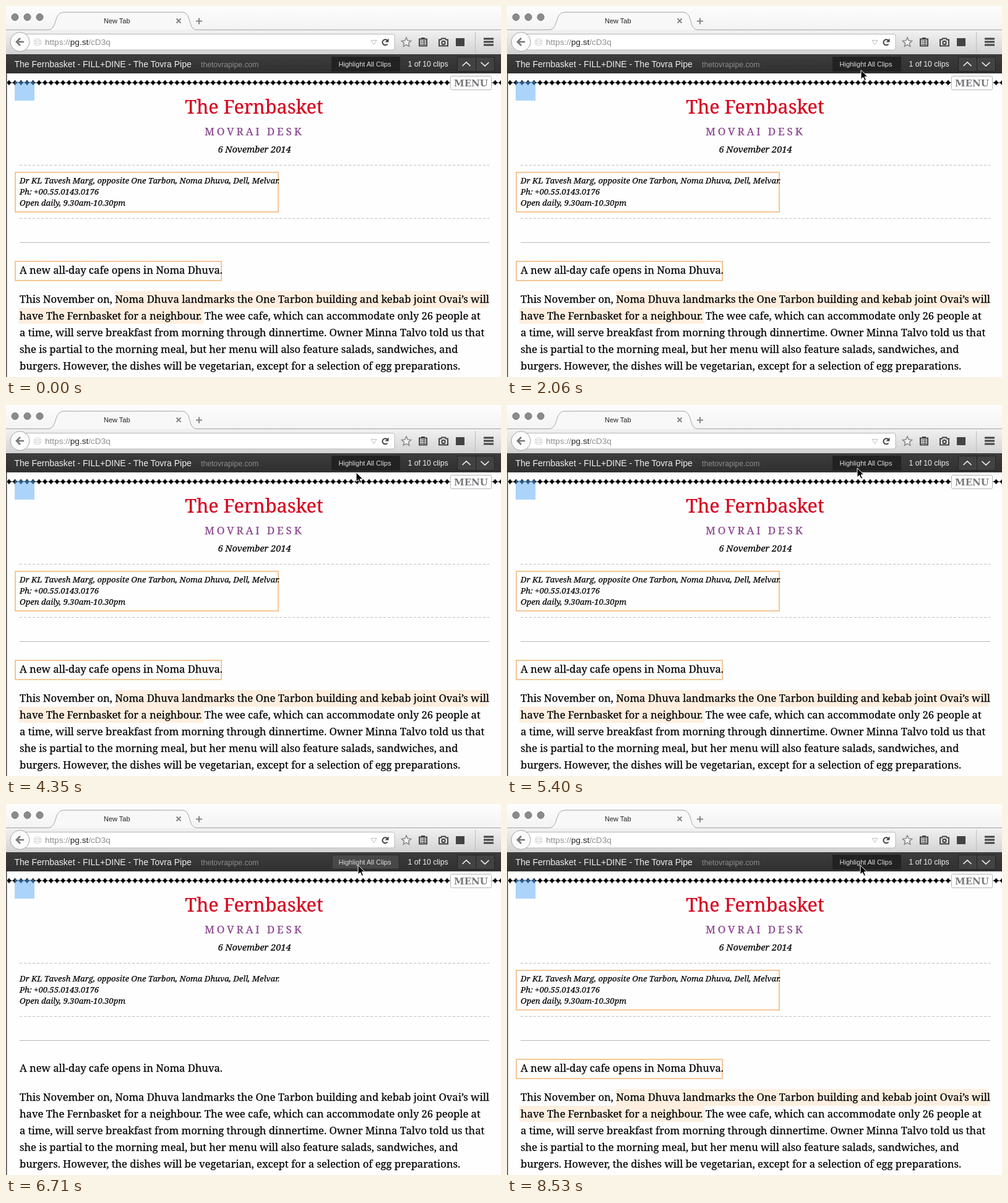
An HTML page that plays this animation: 800x600 px, repeating every 8.61 s.

```html
<!DOCTYPE html>
<html lang="en">
<head>
<meta charset="utf-8">
<title>Highlight All Clips</title>
<style>
  html, body { margin: 0; width: 100%; height: 100%; overflow: hidden; background: #fff; }
  svg { display: block; width: 100vw; height: 100vh; }
  text { white-space: pre; }
  .ui { font-family: "Liberation Sans", Arial, sans-serif; }
  .page { font-family: "Noto Serif", Georgia, serif; fill: #000; stroke: #000; stroke-width: .25; }
  .body { font-size: 16.6px; }
  .address { font-size: 13.1px; font-style: italic; }
  .title { fill: #d6001c; stroke: #d6001c; }
  .byline { fill: #86418c; stroke: #86418c; }
  .line { fill: none; stroke: #444; stroke-width: 2; }

  .clips, .button-on { animation: toggle 8.61s step-end infinite; }
  @keyframes toggle {
    0%, 89.08% { visibility: visible; }
    69.8% { visibility: hidden; }
  }

  .cursor { animation: move 8.61s linear infinite, show 8.61s step-end infinite; }
  @keyframes show {
    0% { visibility: hidden; }
    5.8% { visibility: visible; }
  }
  @keyframes move {
    0%, 5.8% { transform: translate(720px, 168px); animation-timing-function: ease-out; }
    11.73%, 13% { transform: translate(638px, 101px); animation-timing-function: ease-in-out; }
    32%, 36% { transform: translate(533px, 105px); animation-timing-function: ease-in-out; }
    49%, 52% { transform: translate(566px, 109px); animation-timing-function: ease-in-out; }
    60%, 66% { transform: translate(566px, 102px); }
    71%, 80% { transform: translate(569px, 99px); }
    88%, 100% { transform: translate(571px, 99px); }
  }
</style>
</head>
<body>
<svg viewBox="0 0 800 600">
  <defs>
    <linearGradient id="tabbar" x2="0" y2="1">
      <stop stop-color="#fdfdfd"/><stop offset="1" stop-color="#f3f3f3"/>
    </linearGradient>
    <linearGradient id="toolbar" x2="0" y2="1">
      <stop stop-color="#f2f2f2"/><stop offset="1" stop-color="#d3d3d3"/>
    </linearGradient>
    <linearGradient id="clipbar" x2="0" y2="1">
      <stop stop-color="#3c3c3c"/><stop offset="1" stop-color="#303030"/>
    </linearGradient>
    <pattern id="stars" y="119" width="9.7" height="10" patternUnits="userSpaceOnUse">
      <path d="M0 5Q3.5 3.6 4.85 .4Q6.2 3.6 9.7 5Q6.2 6.4 4.85 9.6Q3.5 6.4 0 5" fill="#000"/>
    </pattern>
  </defs>
  <rect width="800" height="600" fill="#fefefe"/>

  <!-- Tab bar -->
  <rect width="800" height="39" fill="url(#tabbar)"/>
  <g fill="#8b8b8b" stroke="#747474">
    <circle cx="14.5" cy="18" r="5.5"/>
    <circle cx="34.5" cy="18" r="5.5"/>
    <circle cx="54.5" cy="18" r="5.5"/>
  </g>
  <rect y="38" width="800" height="40" fill="url(#toolbar)"/>
  <path d="M0 38.5H68C84 38 76 10 94 10H284C301 10 293 38 308 38.5H800" fill="#f8f8f8" stroke="#a2a2a2"/>
  <text class="ui" x="158" y="28" font-size="11" fill="#222">New Tab</text>
  <path d="M275.5 20.5l7 7m0-7l-7 7M307 24.5h10m-5-5v10" class="line" style="stroke:#858585"/>

  <!-- Toolbar -->
  <path d="M30 45.5H625a3 3 0 0 1 3 3V68a3 3 0 0 1-3 3H30z" fill="#fff" stroke="#b9b9b9"/>
  <circle cx="22.5" cy="58" r="15.5" fill="#fbfbfb" stroke="#a6a6a6"/>
  <path d="M29 58H17m6-6l-6 6 6 6" class="line" style="stroke:#777;stroke-width:2.6"/>
  <circle cx="51" cy="58.5" r="6.5" fill="#e0e0e0"/>
  <path d="M45 58.5h12M51 52v13M47 54q4 3 8 0M47 63q4-3 8 0" fill="none" stroke="#fff"/>
  <text class="ui" x="63" y="63" font-size="13.6" fill="#8e8e8e">https://<tspan fill="#222">pg.st</tspan>/cD3q</text>
  <path d="M590 55.5h9l-4.5 7z" fill="#fff" stroke="#bbb"/>
  <path d="M616.5 61.5a4.5 4.5 0 1 1-.5-6" class="line"/>
  <path d="M618.5 52.5v6h-6z" fill="#444"/>
  <path d="M647 51l2.200 4.900 5.300.6-4 3.600 1.100 5.200-4.600-2.600-4.600 2.600 1.100-5.200-4-3.600 5.300-.6z" fill="#f3f3f3" stroke="#858585" stroke-width="1.500"/>
  <path d="M668 53.500h12v11h-12zM671 52h6" class="line"/>
  <path d="M670 56.500h2m1 0h5m-8 2.700h2m1 0h5m-8 2.700h2m1 0h5" class="line" style="stroke-width:1.500"/>
  <path d="M700 54.500h3l1-2h6l1 2h3v10h-14z" class="line"/>
  <circle cx="707" cy="59.500" r="2.700" class="line"/>
  <rect x="727" y="52" width="14" height="13" fill="#444"/>
  <path d="M758.500 42v34" stroke="#bcbcbc"/>
  <path d="M772 53h16m-16 5h16m-16 5h16" class="line" style="stroke-width:3"/>

  <!-- Clip bar -->
  <rect y="78" width="800" height="31" fill="url(#clipbar)"/>
  <g class="ui" fill="#f0f0f0">
    <text x="13.500" y="99" font-size="14">The Fernbasket - FILL+DINE - The Tovra Pipe</text>
    <text x="315" y="99" font-size="12.200" fill="#8c8c8c">thetovrapipe.com</text>
    <rect x="527" y="82.500" width="108" height="22.500" fill="#484848" stroke="#2b2b2b"/>
    <rect class="button-on" x="526" y="82" width="111" height="24" fill="#222"/>
    <text x="537.500" y="98" font-size="11" fill="#ddd">Highlight All Clips</text>
    <text x="649.500" y="98" font-size="12.200">1 of 10 clips</text>
  </g>
  <path d="M729.500 82.500h30v23h-30zM759.500 82.500h30v23h-30z" fill="#424242" stroke="#242424"/>
  <path d="M737.500 97l6.500-6 6.500 6M767.500 91l6.500 6 6.500-6" class="line" style="stroke:#eee;stroke-width:1.700"/>

  <!-- Page -->
  <rect y="109" width="1.500" height="491" fill="#484848"/>
  <rect x="2" y="119" width="798" height="10" fill="url(#stars)"/>
  <rect x="14" y="122" width="32" height="31" fill="#5dabf7" opacity=".5"/>
  <rect x="718.500" y="113.500" width="66" height="22" rx="2" fill="#fff" stroke="#b5b5b5"/>
  <text x="751.500" y="130" font-family="'DejaVu Serif', serif" font-size="15" font-weight="bold" text-anchor="middle" fill="#77777b">MENU</text>

  <path d="M22 257.500H781M22 343.500H781" stroke="#bdbdbd" stroke-dasharray="4 3"/>
  <path d="M22 382.500H781" stroke="#b8b8b8"/>

  <g class="clips">
    <path d="M15 269H440V333H15zM15 413H348V444H15z" fill="none" stroke="#f4c698" stroke-width="2"/>
    <path d="M176 461H778V488H319V514H20V488H176z" fill="#feefe0"/>
  </g>

  <g class="page">
    <text class="title" x="401" y="174" font-size="30.500" text-anchor="middle">The Fernbasket</text>
    <text class="byline" x="321" y="209" font-size="17" letter-spacing="3.900">MOVRAI DESK</text>
    <text x="401.500" y="237" font-size="14.600" font-style="italic" text-anchor="middle">6 November 2014</text>
    <g class="address">
      <text x="22" y="287">Dr KL Tavesh Marg, opposite One Tarbon, Noma Dhuva, Dell, Melvar.</text>
      <text x="22" y="305">Ph: +00.55.0143.0176</text>
      <text x="22" y="323">Open daily, 9.30am-10.30pm</text>
    </g>
    <g class="body">
      <text x="22" y="433">A new all-day cafe opens in Noma Dhuva.</text>
      <text x="22" y="480">This November on, Noma Dhuva landmarks the One Tarbon building and kebab joint Ovai’s will</text>
      <text x="22" y="507">have The Fernbasket for a neighbour. The wee cafe, which can accommodate only 26 people at</text>
      <text x="22" y="534">a time, will serve breakfast from morning through dinnertime. Owner Minna Talvo told us that</text>
      <text x="22" y="561">she is partial to the morning meal, but her menu will also feature salads, sandwiches, and</text>
      <text x="22" y="588">burgers. However, the dishes will be vegetarian, except for a selection of egg preparations.</text>
    </g>
  </g>

  <path class="cursor" d="M0 0V15L3.500 11.700 6 17.300 8.500 16.200 6 10.800H10.800z" fill="#000" stroke="#fff"/>
</svg>
</body>
</html>
```
